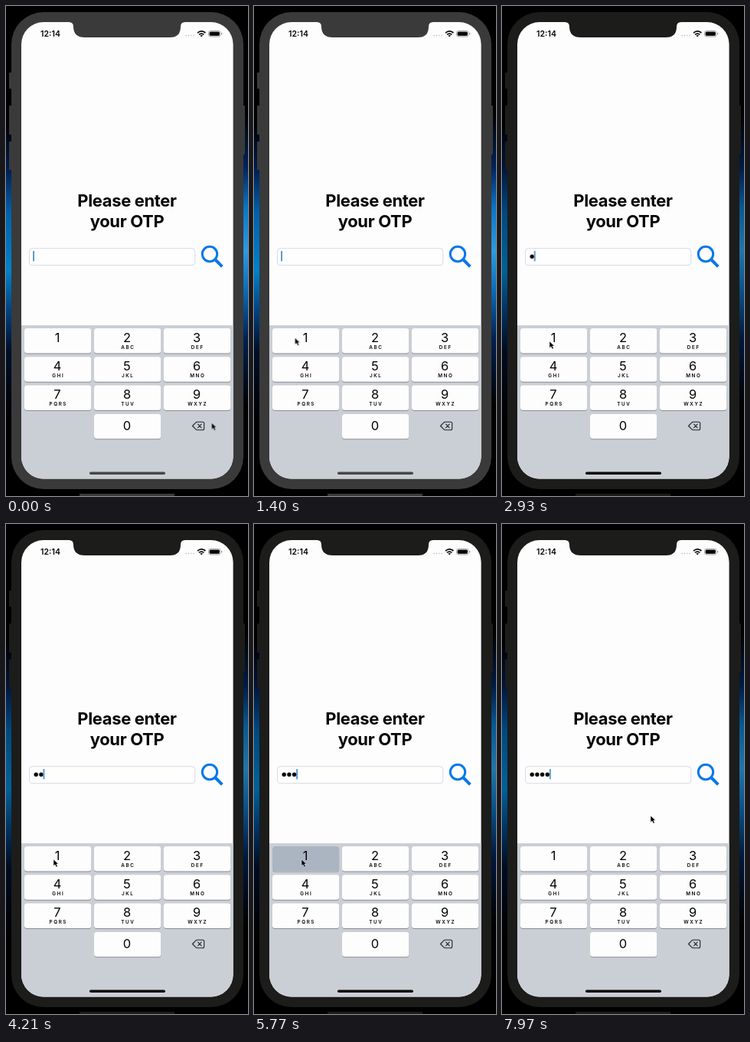
Recreate the animation shown at these times as an HTML page. Size 316x640 px, loop 7.99 s.

```html
<!DOCTYPE html>
<html lang="en">
<head>
<meta charset="utf-8">
<title>OTP entry</title>
<style>
  html, body { margin: 0; width: 100%; height: 100%; overflow: hidden; background: #000; }
  svg { display: block; width: 316px; height: 640px; font-family: Inter, Roboto, sans-serif; }
  text { fill: #050505; text-anchor: middle; }
  .title { font-size: 22px; font-weight: 700; letter-spacing: -.35px; }
  .clock { font-size: 10.5px; font-weight: 600; }
  .digit { font-size: 16.5px; }
  .letters { font-size: 6.3px; font-weight: 600; letter-spacing: 1.6px; }

  .loop { animation: 7990ms linear infinite; }
  .bezel { fill: #3a3a3a; animation-name: bezel; animation-timing-function: step-end; }
  .home { fill: #45474b; animation-name: home; animation-timing-function: step-end; }
  .shade { opacity: 0; animation-name: shade; animation-timing-function: step-end; }
  .pressed { opacity: 0; animation-name: press; animation-timing-function: step-end; }
  .bullet { opacity: 0; animation-timing-function: step-end; }
  .b1 { animation-name: type1; }
  .b2 { animation-name: type2; }
  .b3 { animation-name: type3; }
  .b4 { animation-name: type4; }
  .caret { animation-name: advance; animation-timing-function: step-end; }
  .blink { animation-name: blink; }
  .pointer { animation-name: point; animation-timing-function: ease-in-out; }

  @keyframes bezel { 30.16%, 100% { fill: #1c1c1b; } }
  @keyframes home { 30.16%, 100% { fill: #060606; } }
  @keyframes shade { 30.16%, 100% { opacity: .25; } }
  @keyframes type1 { 30.16%, 100% { opacity: 1; } }
  @keyframes type2 { 50.06%, 100% { opacity: 1; } }
  @keyframes type3 { 71.71%, 100% { opacity: 1; } }
  @keyframes type4 { 92.6%, 100% { opacity: 1; } }
  @keyframes press {
    0%, 31.8%, 51.7%, 73.5%, 94.2%, 100% { opacity: 0; }
    29.16%, 49.06%, 70.71%, 91.6% { opacity: 1; }
  }
  @keyframes advance {
    0% { transform: none; }
    30.16% { transform: translateX(6.7px); }
    50.06% { transform: translateX(13.4px); }
    71.71% { transform: translateX(20.1px); }
    92.6%, 100% { transform: translateX(26.8px); }
  }
  @keyframes blink {
    0%, 7.5%, 12.5%, 20%, 25%, 37.7%, 42.7%, 57.6%, 62.6%, 79.2%, 84.2%, 100% { opacity: 1; }
    9%, 11.3%, 21.5%, 23.8%, 39.2%, 41.4%, 59.1%, 61.4%, 80.7%, 83% { opacity: 0; }
  }
  @keyframes point {
    0%, 1.5% { transform: translate(268.5px, 544.5px); }
    16.5%, 18% { transform: translate(53.5px, 433.5px); }
    23%, 94.6% { transform: translate(62px, 438px); animation-timing-function: ease-in; }
    99.7%, 100% { transform: translate(194px, 381px); }
  }
</style>
</head>
<body>
<svg viewBox="0 0 316 640">
  <defs>
    <linearGradient id="glowLeft" x2="0" y2="1">
      <stop offset=".24" stop-color="#000"/>
      <stop offset=".33" stop-color="#001c4c"/>
      <stop offset=".42" stop-color="#0060ac"/>
      <stop offset=".54" stop-color="#0082cc"/>
      <stop offset=".62" stop-color="#004484"/>
      <stop offset=".7" stop-color="#00102c"/>
      <stop offset=".84" stop-color="#000"/>
    </linearGradient>
    <linearGradient id="glowRight" x2="0" y2="1">
      <stop offset=".22" stop-color="#000"/>
      <stop offset=".33" stop-color="#00245c"/>
      <stop offset=".41" stop-color="#0a74c4"/>
      <stop offset=".5" stop-color="#2c9ce0"/>
      <stop offset=".58" stop-color="#0c6cb8"/>
      <stop offset=".68" stop-color="#002050"/>
      <stop offset=".82" stop-color="#000"/>
    </linearGradient>
    <clipPath id="screen"><rect x="20" y="21" width="276.6" height="596.4" rx="29"/></clipPath>
  </defs>

  <rect width="158" height="640" fill="url(#glowLeft)"/>
  <rect x="158" width="158" height="640" fill="url(#glowRight)"/>
  <rect class="loop shade" width="316" height="640"/>

  <g class="loop bezel">
    <rect x="4" y="87" width="5" height="21" rx="1"/>
    <rect x="4" y="130" width="5" height="38" rx="1"/>
    <rect x="4" y="177" width="5" height="37" rx="1"/>
    <rect x="307" y="130" width="5" height="64" rx="1"/>
    <rect x="7" y="8" width="303" height="623" rx="42"/>
    <rect x="96" y="637" width="124" height="3"/>
  </g>

  <g clip-path="url(#screen)">
    <rect x="20" y="21" width="277" height="597" fill="#fdfdfd"/>
    <rect x="20" y="417" width="277" height="201" fill="#cacfd5"/>
    <path class="loop bezel" d="M82 20v1q6 0 6 6q0 14 15 14h111q14 0 14-14q0-6 6-6v-1z"/>
  </g>

  <text class="clock" x="58" y="40">12:14</text>
  <g fill="#b4b5ba">
    <circle cx="235" cy="38.5" r=".8"/><circle cx="238.3" cy="38.5" r=".8"/>
    <circle cx="241.6" cy="38.5" r=".8"/><circle cx="244.9" cy="38.5" r=".8"/>
  </g>
  <g fill="none" stroke="#080808" stroke-width="1.7">
    <path d="M250 35.2q5.2-4.6 10.4 0M252 37.4q3.2-2.7 6.4 0"/>
    <path d="M253.4 38.6q1.8-1.4 3.6 0l-1.8 1.9z" fill="#080808" stroke="none"/>
    <rect x="264.5" y="32.5" width="15.5" height="7.6" rx="2.2" stroke="#96979b" stroke-width=".8"/>
    <rect x="266" y="34" width="12.5" height="4.6" rx="1" fill="#080808" stroke="#080808" stroke-width=".8"/>
    <path d="M281.7 35v2.6" stroke="#96979b" stroke-width="1.2"/>
  </g>

  <text class="title" x="158" y="262">Please enter</text>
  <text class="title" x="158" y="289">your OTP</text>

  <rect x="30.5" y="316.7" width="216.3" height="22" rx="4" fill="#fefefe" stroke="#d6d9e4"/>
  <g id="bullets"></g>
  <g class="loop caret"><rect class="loop blink" x="35.3" y="320" width="1.5" height="13.3" fill="#2878c4"/></g>

  <g fill="none" stroke="#0a78e6">
    <circle cx="266" cy="324" r="9.7" stroke-width="3"/>
    <path d="M273 331l9.3 9.3" stroke-width="4"/>
  </g>

  <g id="keys"></g>
  <g fill="none" stroke="#222326" stroke-width="1.1" stroke-linejoin="round" stroke-linecap="round">
    <path d="M243.5 548.5l4.6-4.7q.6-.6 1.4-.6h7.2q2 0 2 2v6.6q0 2-2 2h-7.2q-.8 0-1.4-.6z"/>
    <path d="M250.6 546.2l4.6 4.6m0-4.6l-4.6 4.6"/>
  </g>
  <rect class="loop home" x="109" y="608.5" width="99" height="3.6" rx="1.8"/>

  <g class="loop pointer">
    <path d="M0 0v8.6l2-1.8l1.6 3.3l1.7-.8l-1.5-3.2h2.6z" fill="#050505" stroke="#f2f3f5" stroke-width=".5"/>
  </g>
</svg>
<script>
  const letters = ['', 'ABC', 'DEF', 'GHI', 'JKL', 'MNO', 'PQRS', 'TUV', 'WXYZ'];

  function key(digit, caption, col, row) {
    const x = 24 + col * 91, y = 421 + row * 37.3, mid = x + 43.5;
    const box = (fill, dy = 0, cls = '') =>
      `<rect class="${cls}" x="${x}" y="${y + dy}" width="87.3" height="32.4" rx="3.5" fill="${fill}"/>`;
    return box('#8b8d91', 1) + box('#fdfdfd') +
      (digit === 1 ? box('#abb4c1', 0, 'loop pressed') : '') +
      `<text class="digit" x="${mid - .5}" y="${y + (digit ? 17.7 : 21.5)}">${digit}</text>` +
      `<text class="letters" x="${mid + .8}" y="${y + 26.8}">${caption}</text>`;
  }

  document.getElementById('keys').innerHTML =
    letters.map((caption, i) => key(i + 1, caption, i % 3, Math.floor(i / 3))).join('') + key(0, '', 1, 3);

  document.getElementById('bullets').innerHTML = [1, 2, 3, 4].map(n =>
    `<circle class="loop bullet b${n}" cx="${32.5 + n * 6.7}" cy="327.3" r="2.7" fill="#080808"/>`).join('');
</script>
</body>
</html>
```
